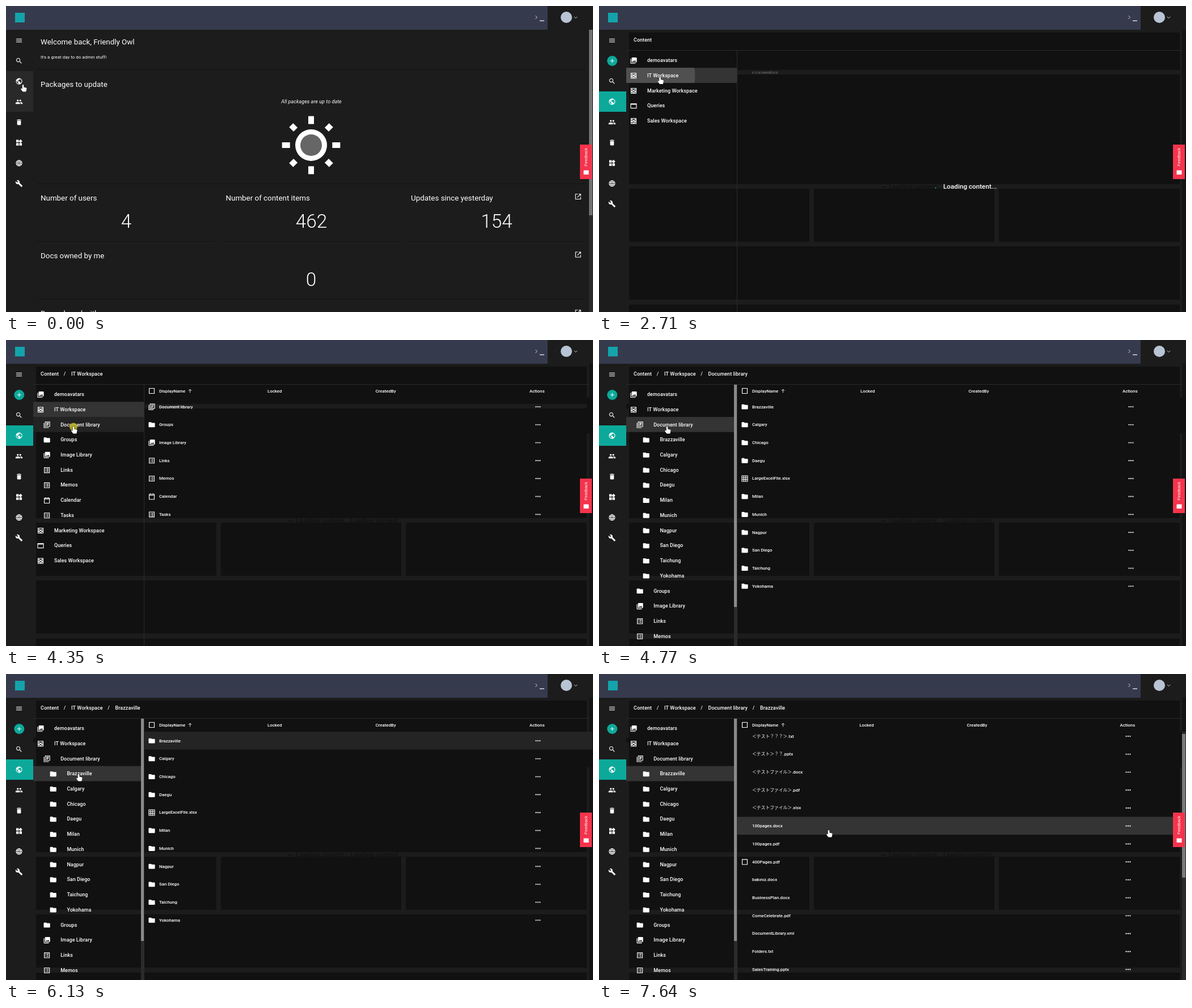
Recreate the animation shown at these times as an HTML page with a canvas. Size 1035 by 541 pixels, loop 7.71 s.

```html
<!DOCTYPE html>
<html lang="en">
<head>
<meta charset="utf-8">
<title>Admin dashboard</title>
<style>
html, body { margin: 0; width: 100%; height: 100%; overflow: hidden; background: #1c1c1c; }
canvas { display: block; width: 1035px; height: 541px; }
</style>
</head>
<body>
<canvas id="stage"></canvas>
<script>
const W = 1035, H = 541, LOOP = 7710, STEP = 70;
const TEAL = '#0ca99b', BASE = '#1c1c1c', DARK = '#111111', USER = 'Friendly Owl';
const canvas = document.getElementById('stage');
const ctx = canvas.getContext('2d');
const ratio = window.devicePixelRatio || 1;
canvas.width = W * ratio;
canvas.height = H * ratio;

// 24-unit icons: solid ones are filled, line ones are stroked
const solid = {
  menu: 'M3 18h18v-2H3zM3 13h18v-2H3zM3 6v2h18V6z',
  search: 'M15.5 14h-.8l-.3-.3A6.5 6.5 0 1 0 13.7 14.4l.3.3v.8l5 5 1.5-1.5zM9.5 14A4.5 4.5 0 1 1 9.5 5a4.5 4.5 0 0 1 0 9z',
  earth: 'M12 2a10 10 0 1 0 0 20 10 10 0 0 0 0-20zM11 19.9A8 8 0 0 1 4.2 10.2L9 15v1a2 2 0 0 0 2 2zM17.9 17.4A2 2 0 0 0 16 16h-1v-3a1 1 0 0 0-1-1H8v-2h2a1 1 0 0 0 1-1V7h2a2 2 0 0 0 2-2v-.4a8 8 0 0 1 2.9 12.8z',
  people: 'M16 11a3 3 0 1 0 0-6 3 3 0 0 0 0 6zM8 11a3 3 0 1 0 0-6 3 3 0 0 0 0 6zM8 13c-2.3 0-7 1.2-7 3.5V19h14v-2.5C15 14.200 10.300 13 8 13zM16 13l-1 .05c1.200.8 2 2 2 3.450V19h6v-2.5c0-2.300-4.700-3.500-7-3.500z',
  trash: 'M6 19a2 2 0 0 0 2 2h8a2 2 0 0 0 2-2V7H6zM19 4h-3.500l-1-1h-5l-1 1H5v2h14z',
  widgets: 'M13 13v8h8v-8zM3 21h8v-8H3zM3 3v8h8V3zM16.700 1.700L11 7.300 16.700 13l5.600-5.700z',
  wrench: 'M22.700 19l-9.100-9.100c.9-2.300.4-5-1.500-6.900-2-2-5-2.400-7.400-1.300L9 6 6 9 1.600 4.700C.4 7.100.9 10.100 2.900 12.100c1.900 1.900 4.600 2.400 6.900 1.500l9.100 9.100c.4.4 1 .4 1.400 0l2.300-2.300c.5-.4.5-1.100.1-1.400z',
  folder: 'M10 4H4a2 2 0 0 0-2 2v12a2 2 0 0 0 2 2h16a2 2 0 0 0 2-2V8a2 2 0 0 0-2-2h-8z',
  images: 'M22 16V4a2 2 0 0 0-2-2H8a2 2 0 0 0-2 2v12a2 2 0 0 0 2 2h12a2 2 0 0 0 2-2zM11 12l2 2.700L16 11l4 5H8zM2 6v14a2 2 0 0 0 2 2h14v-2H4V6z'
};
const line = {
  web: 'M12 3a9 9 0 1 0 0 18 9 9 0 0 0 0-18zM12 3c-5 5-5 13 0 18 5-5 5-13 0-18M4 9h16M4 15h16',
  space: 'M4 4h16v16H4zM4 7.500h4.500a3.500 3 0 0 0 7 0H20M4 12.500h16M4 15h4.500a3.500 3 0 0 0 7 0H20',
  window: 'M3 5h18v14H3zM3 7h18',
  books: 'M7 3h14v14H7zM3 6v15h15M10 7h8M10 10h8M10 13h5',
  list: 'M4 4h16v16H4zM7 8h2M11 8h6M7 12h2M11 12h6M7 16h2M11 16h6',
  calendar: 'M4 5h16v16H4zM4 8h16M8 2v3M16 2v3',
  grid: 'M3 3h18v18H3zM3 9h18M3 15h18M9 3v18M15 3v18',
  box: 'M4 4h16v16H4z',
  open: 'M11 4H4v16h16v-7M14 4h6v6M20 4L9.500 14.500',
  up: 'M12 20V5M5 12l7-7 7 7',
  plus: 'M12 5v14M5 12h14',
  down: 'M5 9l7 7 7-7',
  next: 'M8 4l8 8-8 8'
};
const paths = {};
for (const k in solid) paths[k] = new Path2D(solid[k]);
for (const k in line) paths[k] = new Path2D(line[k]);
const hand = new Path2D('M-1.3 1.2a1.3 1.3 0 0 1 2.600 0v3.300l4.200 1q1 .4 1 1.500l-.8 4.200q-.2 1.300-1.400 1.300H.2q-.9 0-1.400-.7L-4 7.800l.7-.7q.6-.4 1.200-.1l.8.4z');

const places = ['Brazzaville', 'Calgary', 'Chicago', 'Daegu', 'Milan', 'Munich', 'Nagpur', 'San Diego', 'Taichung', 'Yokohama'];
const folders = places.map(n => [n, 'folder']);
const root = [['demoavatars', 'images'], ['IT Workspace', 'space'], ['Marketing Workspace', 'space'],
  ['Queries', 'window'], ['Sales Workspace', 'space']];
const itItems = [['Document library', 'books'], ['Groups', 'folder'], ['Image Library', 'images'],
  ['Links', 'list'], ['Memos', 'list'], ['Calendar', 'calendar'], ['Tasks', 'list']];
const library = [...folders.slice(0, 4), ['LargeExcelFile.xlsx', 'grid'], ...folders.slice(4)];
const files = ['＜テスト？？？＞.txt', '＜テスト＞？？.pptx', '＜テストファイル＞.docx', '＜テストファイル＞.pdf',
  '＜テストファイル＞.xlsx', '100pages.docx', '100pages.pdf', '400Pages.pdf', 'bakınız.docx', 'BusinessPlan.docx',
  'ComeCelebrate.pdf', 'DocumentLibrary.xml', 'Folders.txt', 'SalesTraining.pptx', 'Schedule.docx', 'Summary.pdf'].map(n => [n]);
const cards = [[53, 47, 971, 66], [53, 121, 971, 194], [53, 323, 318, 94], [379, 323, 318, 94],
  [705, 323, 319, 94], [53, 425, 971, 94], [53, 528, 971, 20]];

function rect(x, y, w, h, color) {
  ctx.fillStyle = color;
  ctx.fillRect(x, y, w, h);
}
function disc(x, y, r, color) {
  ctx.fillStyle = color;
  ctx.beginPath();
  ctx.arc(x, y, r, 0, 7);
  ctx.fill();
}
// y is the middle of the capitals; returns the width
function text(s, x, y, size, { weight = 400, gap = 0, color = '#fff', align = 'left', style = '', family = 'Roboto' } = {}) {
  ctx.font = `${style} ${weight} ${size}px ${family}, "Noto Sans CJK JP", "Noto Sans CJK", sans-serif`;
  ctx.letterSpacing = gap + 'px';
  ctx.textAlign = align;
  ctx.fillStyle = color;
  ctx.fillText(s, x, y + size * 0.355);
  return ctx.measureText(s).width;
}
const title = (s, x, y) => text(s, x, y, 13.37);
const figure = (s, x, y) => text(s, x, y, 33.4, { weight: 300, align: 'center' });
const cell = (s, x, y) => text(s, x, y, 7.8, { weight: 500 });

function icon(name, x, y, size = 13.4, color = '#fff') {
  ctx.save();
  ctx.translate(x - size / 2, y - size / 2);
  ctx.scale(size / 24, size / 24);
  if (solid[name]) {
    ctx.fillStyle = color;
    ctx.fill(paths[name], 'evenodd');
  } else {
    ctx.strokeStyle = color;
    ctx.lineWidth = 2;
    ctx.stroke(paths[name]);
  }
  ctx.restore();
}
function clipped(x, y, w, h, draw) {
  ctx.save();
  ctx.beginPath();
  ctx.rect(x, y, w, h);
  ctx.clip();
  draw();
  ctx.restore();
}
const avatar = (x, y, r) => disc(x, y, r, '#b8c4d4');
const within = (t, a, b) => t >= a && t < b;

// progress in held steps; the first step is already a move
function steps(t, a, n) {
  if (t < a) return 0;
  const p = Math.min(1, (Math.floor((t - a) / STEP) + 1) / n);
  return p * p * (3 - 2 * p);
}

function cursorAt(t) {
  const moves = [[70, 1, 30, 137], [1820, 6, 107.5, 125.5], [3790, 7, 119, 153],
    [4630, 1, 120, 153], [5170, 4, 128, 177], [6340, 10, 405, 276]];
  let x = 30, y = 139;
  for (const [a, n, tx, ty] of moves) {
    const p = steps(t, a, n);
    x += (tx - x) * p;
    y += (ty - y) * p;
  }
  return [x, y];
}

function scrollAt(t) {
  if (t < 7230) return 0;
  const p = Math.min(1, (Math.floor((t - 7230) / 82) + 1) / 6);
  return 8 * p + 54 * Math.sin(Math.PI * p);
}

function header() {
  rect(0, 0, 955, 42, '#363a4d');
  rect(955, 0, 80, 42, BASE);
  rect(16, 12, 17, 17, '#14a3ab');
  icon('next', 935, 20, 9);
  rect(941, 25.5, 8, 1.2, '#fff');
  avatar(988, 20, 10);
  icon('down', 1004.5, 20, 9.5);
}

function sidebar(t, inside) {
  rect(0, 42, 48, 499, BASE);
  const names = ['search', 'earth', 'people', 'trash', 'widgets', 'web', 'wrench'];
  icon('menu', 23, 61);
  if (inside) {
    if (t < 1820) rect(0, 115, 48, 36, '#2e2e2e');
    rect(0, 151, 48, 36, TEAL);
    disc(23.3, 97, 9, TEAL);
    icon('plus', 23.3, 97, 12);
  } else {
    rect(0, 115, 48, 72, '#292929');
  }
  names.forEach((n, i) => icon(n, 23, (inside ? 133 : 97) + i * 36.15));
}

function sun(x, y) {
  disc(x, y, 28, '#fff');
  disc(x, y, 19, '#666');
  for (let i = 0; i < 8; i++) {
    const h = i % 2 ? 11 : 14;
    ctx.save();
    ctx.translate(x, y);
    ctx.rotate(i * Math.PI / 4);
    rect(-5, -44.3 - h / 2, 10, h, '#fff');
    ctx.restore();
  }
}

function dashboard() {
  for (const [x, y, w, h] of cards) rect(x + 2, y + h - 1.5, w - 4, 1.5, '#151515');
  title('Welcome back, ' + USER, 61, 63);
  text("It's a great day to do admin stuff!", 61, 90, 7.8, { gap: 0.08 });
  title('Packages to update', 61, 138);
  text('All packages are up to date', 538.5, 168.5, 8.92, { gap: 0.084, style: 'italic', align: 'center' });
  sun(538, 246);
  [['Number of users', 61, '4', 212], ['Number of content items', 387.5, '462', 538.5],
    ['Updates since yesterday', 714, '154', 865]].forEach(([s, x, n, cx]) => {
    title(s, x, 339.5);
    figure(n, cx, 380.5);
  });
  title('Docs owned by me', 61, 441.5);
  figure('0', 538, 483);
  title('Docs shared with me', 61, 543);
  for (const y of [337, 439.5, 542]) icon('open', 1008.700, y);
  rect(1028, 42, 7, 499, '#2b2b2b');
  rect(1028, 42, 6, 328, '#737373');
}

const loadingText = (x, color) => text('Loading content...', x, 319, 11.7, { weight: 500, color });

function backdrop(t) {
  for (const c of cards) rect(...c, DARK);
  rect(48, 113, 195, 8, DARK);
  rect(1028, 42, 7, 499, '#141414');
  if (t >= 1350) {
    rect(498, 319, 7, 2, DARK);
    loadingText(511, DARK);
  }
  if (t >= 2640) cell('demoavatars', 270, 117.6), text('demoavatars', 270, 117.6, 7.8, { weight: 500, color: DARK });
  if (t >= 2920) {
    rect(1024, 102, 11, 63, DARK);
    loadingText(607, DARK);
  }
  if (t >= 4630) rect(243, 102, 792, 32, DARK);
}

function loader(t, x) {
  ctx.strokeStyle = TEAL;
  ctx.lineWidth = 1.6;
  const a = 2.5 + (t - 2710) / 120;
  ctx.beginPath();
  ctx.arc(x - 8.500, 319, 5.600, a, a + 0.35 + Math.abs(t - 2710) / 160 % 4);
  ctx.stroke();
  loadingText(x, '#fff');
}

function crumbs(t) {
  const trail = ['Content'];
  if (t >= 2920) trail.push('IT Workspace');
  if (within(t, 4700, 6060) || t >= 6410) trail.push('Document library');
  if (t >= 6060) trail.push('Brazzaville');
  let x = 61;
  trail.forEach((s, i) => {
    const o = { weight: 500, gap: 0.084 };
    if (i) text('/', x - 11.5, 60, 8.92, { ...o, align: 'center' });
    x += text(s, x, 60, 8.92, o) + 22;
  });
}

function tree(t, pulse) {
  const rows = root.map(r => [...r, 0]);
  if (t >= 2920) rows.splice(2, 0, ...itItems.map(r => [...r, 1]));
  const deep = t >= 4560;
  if (deep) rows.splice(3, 0, ...folders.map(r => [...r, 2]));
  const w = deep ? 190 : 195;
  const picked = t < 2570 ? -1 : t < 4490 ? 1 : t < 5850 ? 2 : 3;
  const hovered = within(t, 4000, 4490) ? 2 : within(t, 5780, 5850) ? 3 : -1;
  rows.forEach(([name, pic, level], i) => {
    const y = 96 + i * 26.72;
    if (y > 555) return;
    if (i === picked || i === hovered) rect(48, y - 13.4, w, 26.7, i === picked ? '#343434' : '#232323');
    if (i === picked && pulse) clipped(48, y - 13.4, w, 26.7, () => disc(pulse.x, y, pulse.r, '#505050'));
    icon(pic, 61 + level * 11.1, y + 0.5);
    text(name, 85 + level * 11.2, y, 8.92, { gap: 0.084, weight: 450 });
  });
  if (deep) {
    rect(238, 79, 5, 462, '#2b2b2b');
    rect(238, 79, 5, 393, '#8a8a8a');
  }
}

function table(t, tip) {
  const inFiles = t >= 6410;
  const rows = t < 2570 ? root : t < 4560 ? itItems : inFiles ? files : library;
  const shift = inFiles ? 1 : 0;
  const scroll = scrollAt(t);
  icon('box', 257, 90);
  cell('DisplayName', 270, 90);
  icon('up', 324.5, 90, 10);
  cell('Locked', 461 - shift * 1.700, 90);
  cell('CreatedBy', 651.500 - shift * 3, 90);
  cell('Actions', 923 - shift * 4.5, 90);
  clipped(243, 102, 792, 439, () => rows.forEach(([name, pic], i) => {
    const y = 117.800 + i * 31.72 - scroll, top = y - 15.9;
    const hover = tip[0] > 243 && tip[1] >= top && tip[1] < top + 31.72;
    if (inFiles && hover) rect(243, top, 785, 31.72, '#343434');
    if (within(t, 6060, 6340) && i === 0) rect(243, top, 791, 31.72, '#242424');
    if (pic) icon(pic, 257, y + 0.3);
    if (t >= 7300 && name === '400Pages.pdf') icon('box', 257, y + 0.5);
    cell(name, 270, y);
    if (rows === root && name === 'Queries') {
      avatar(663, y, 11);
      cell(USER, 682, y);
    }
    for (const d of [-3.4, 0, 3.4]) disc(938 - shift * 5 + d, y + 0.3, 1.15, '#fff');
  }));
  if (inFiles) {
    rect(1028, 102, 7, 439, '#2b2b2b');
    rect(1028, 102 + scroll / 2, 6, 254, '#7a7a7a');
  }
}

function feedback() {
  rect(1012, 245, 21, 61, '#f4344c');
  ctx.save();
  ctx.translate(1022.800, 267);
  ctx.rotate(-Math.PI / 2);
  text('Feedback', 0, 0, 7.4, { align: 'center', family: '"Liberation Sans"', weight: 400 });
  ctx.restore();
  rect(1018.5, 290.5, 9, 7.5, '#fff');
}

function pointer(t, [x, y]) {
  if ([1000, 2570, 4350, 5780].some(a => within(t, a, a + STEP))) disc(x, y + 0.5, 7, 'rgba(190,180,30,.85)');
  ctx.save();
  ctx.translate(x, y);
  ctx.fillStyle = '#fff';
  ctx.strokeStyle = '#111';
  ctx.lineWidth = 0.9;
  ctx.stroke(hand);
  ctx.fill(hand);
  ctx.restore();
}

function ripple(t, x) {
  const start = [2570, 4420, 5850].find(a => within(t, a, a + 280));
  return start && { x, r: 1 + 30.5 * Math.floor((t - start) / STEP) };
}

function draw(t) {
  ctx.setTransform(ratio, 0, 0, ratio, 0, 0);
  rect(0, 0, W, H, BASE);
  const tip = cursorAt(t);
  const inside = t >= 1140;
  if (!inside) {
    dashboard();
  } else {
    backdrop(t);
    const early = t < 1350;
    const busy = early || within(t, 2640, 2920) || within(t, 4490, 4630) || within(t, 5920, 6060) || within(t, 6340, 6410);
    if (t >= 1280) {
      rect(48, 78, 980, 1, '#2b2b2b');
      rect(243, 79, 1, 462, '#2b2b2b');
      crumbs(t);
      tree(t, ripple(t, tip[0]));
    }
    if (!busy) table(t, tip);
    else if (early) loader(t, 511);
    else if (t >= 2710) loader(t, 607);
  }
  header();
  sidebar(t, inside);
  feedback();
  pointer(t, tip);
}

const begin = performance.now();
function tick() {
  draw((performance.now() - begin) % LOOP);
  requestAnimationFrame(tick);
}
tick();
</script>
</body>
</html>
```
